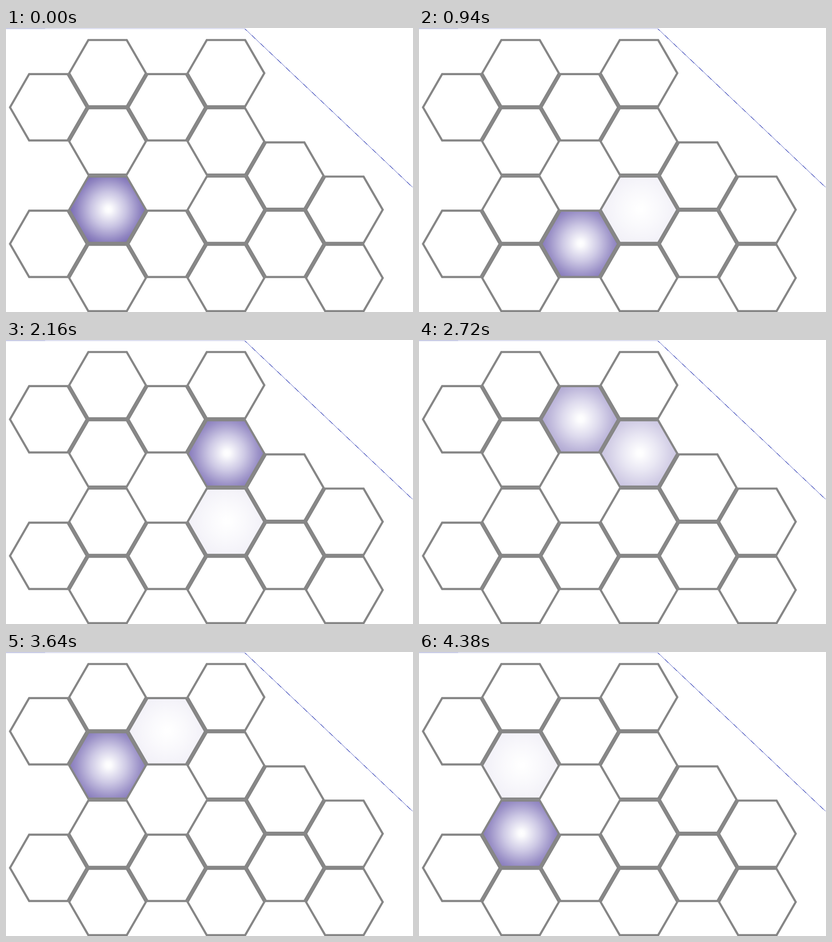
Recreate the animation shown at these times as an HTML page. Size 895 px wide and 626 px high, loop 4440 ms.

```html
<!DOCTYPE html>
<html lang="en">
<head>
<meta charset="utf-8">
<title>Honeycomb</title>
<style>
  html, body { margin: 0; width: 100%; height: 100%; overflow: hidden; background: #fff; }
  svg { display: block; }
</style>
</head>
<body>
<svg width="895" height="626" viewBox="0 0 895 626">
  <defs>
    <radialGradient id="glow" gradientUnits="userSpaceOnUse" cx="2" cy="-1" r="87">
      <stop offset="0" stop-color="#fff"/>
      <stop offset=".08" stop-color="#fbfbfd"/>
      <stop offset=".45" stop-color="#c8c3e2"/>
      <stop offset=".8" stop-color="#9085c1"/>
      <stop offset="1" stop-color="#7668b2"/>
    </radialGradient>
  </defs>
  <g fill="none" stroke-width="1" shape-rendering="crispEdges">
    <path d="M0 1.5H86" stroke="#868cc8"/>
    <path d="M86 1.5H526" stroke="#b4b8e0"/>
    <path d="M525.5 2L894.5 351.5" stroke="#4f5ac0"/>
  </g>
  <g id="fills" fill="url(#glow)"></g>
  <g id="lines" fill="none" stroke="#868686" stroke-width="4.7"></g>
</svg>
<script>
  const HOLD = 200, STEP = 60, PHASE = 740;
  const HEX = "-84.3,0 -42.2,-73.1 42.2,-73.1 84.3,0 42.2,73.1 -42.2,73.1";

  // Rows present in each column; odd columns sit half a cell higher.
  const columns = [[0, 2], [0, 1, 2, 3], [0, 2], [0, 1, 2, 3], [1, 2], [2, 3]];
  // Cells the glow visits, as [column, row].
  const route = [[1, 2], [2, 2], [3, 2], [3, 1], [2, 0], [1, 1]];

  function addHex(parent, col, row) {
    const hex = document.createElementNS("http://www.w3.org/2000/svg", "polygon");
    const x = 93.1 + 130.2 * col;
    const y = (col % 2 ? 99.6 : 174.8) + 150.5 * row;
    hex.setAttribute("points", HEX);
    hex.setAttribute("transform", `translate(${x} ${y})`);
    parent.appendChild(hex);
    return hex;
  }

  const lines = document.getElementById("lines");
  const fills = document.getElementById("fills");
  columns.forEach((rows, col) => rows.forEach(row => addHex(lines, col, row)));
  const glows = route.map(([col, row]) => addHex(fills, col, row));

  function draw(ms) {
    const t = ms % (PHASE * route.length);
    const from = Math.floor(t / PHASE);
    const to = (from + 1) % route.length;
    const local = t % PHASE;
    const mix = local < HOLD ? 0 : (Math.floor((local - HOLD) / STEP) + 1) / 10;
    glows.forEach((glow, i) => {
      glow.setAttribute("opacity", i === from ? 1 - mix : i === to ? mix : 0);
    });
  }

  const start = performance.now();
  function tick() {
    draw(performance.now() - start);
    requestAnimationFrame(tick);
  }
  tick();
</script>
</body>
</html>
```
